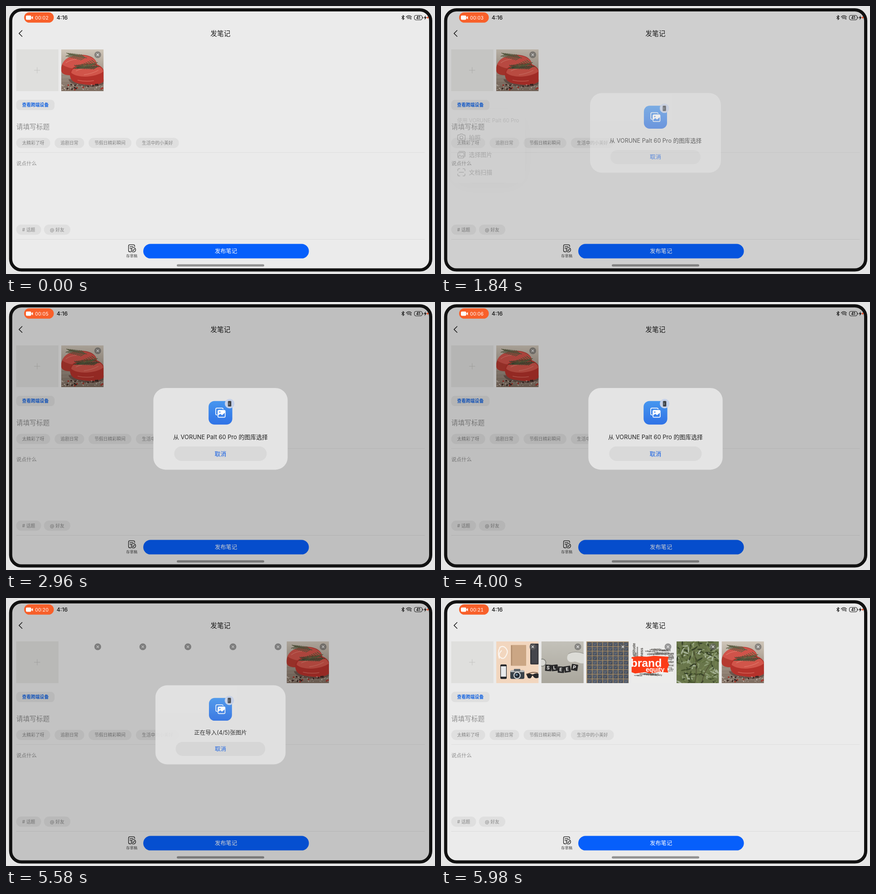
Recreate the animation shown at these times as an HTML page. Size 947 px wide and 592 px high, loop 6.01 s.

```html
<!DOCTYPE html>
<html lang="zh">
<head>
<meta charset="utf-8">
<title>发笔记</title>
<style>
  html, body { margin: 0; width: 100%; height: 100%; overflow: hidden; background: #e5e5e5; }
  svg { display: block; width: 947px; height: 592px; }
  text { font-family: Inter, "Noto Sans CJK SC", "Noto Sans CJK", sans-serif; white-space: pre; }
  .line { fill: none; stroke: #1c1c1c; stroke-width: 1.3; stroke-linecap: round; stroke-linejoin: round; }
  .shadow { filter: drop-shadow(0 9px 26px rgba(0, 0, 0, .12)); }
</style>
</head>
<body>
<svg id="stage" viewBox="0 0 947 592"></svg>
<script>
const LOOP = 6010;
const DEVICE = 'VORUNE Palt 60 Pro';
const THUMB = { w: 93.3, h: 92.3, y: 95.8, step: 99.5, x: 22.5 };

// Markup helpers
const rect = (x, y, w, h, r, fill, extra = '') =>
  `<rect x="${x}" y="${y}" width="${w}" height="${h}" rx="${r}" fill="${fill}" ${extra}/>`;
const circle = (x, y, r, fill, extra = '') =>
  `<circle cx="${x}" cy="${y}" r="${r}" fill="${fill}" ${extra}/>`;
const path = (d, extra = 'class="line"') => `<path d="${d}" ${extra}/>`;
const group = (id, body, extra = '') => `<g id="${id}" ${extra}>${body}</g>`;
// cy is the optical middle of the line
const label = (x, cy, size, str, fill, weight = 400, anchor = 'start', extra = '') =>
  `<text x="${x}" y="${cy + size * .375}" font-size="${size}" fill="${fill}" font-weight="${weight}" text-anchor="${anchor}" ${extra}>${str}</text>`;

function seeded(seed) {
  return () => {
    seed = (seed * 1664525 + 1013904223) % 4294967296;
    return seed / 4294967296;
  };
}
const times = (n, fn) => Array.from({ length: n }, (_, i) => fn(i)).join('');
const slotX = i => THUMB.x + i * THUMB.step;

// Pictures, each drawn in a 93 by 92 box
function sprig(x1, y1, x2, y2, n, color) {
  const dx = (x2 - x1) / n, dy = (y2 - y1) / n;
  let d = `M${x1} ${y1}L${x2} ${y2}`;
  for (let i = 1; i <= n; i++) {
    const x = x1 + dx * i, y = y1 + dy * i, k = 7 - 3 * i / n;
    d += `M${x} ${y}l${dx * 2} ${-k}M${x} ${y}l${dx * 2.4} ${k * .8}`;
  }
  return path(d, `fill="none" stroke="${color}" stroke-width="1.4" stroke-linecap="round"`);
}

function steaks() {
  const rnd = seeded(9);
  return rect(0, 0, 94, 93, 0, 'url(#wood)') +
    times(5, i => path(`M0 ${58 + i * 8}L94 ${52 + i * 9}`, 'stroke="#6b5c50" stroke-opacity=".35" fill="none"')) +
    path('M0 40C4 20 24 11 44 12C66 12 80 22 79 38C70 54 40 56 22 57C8 58 -3 54 0 40Z', 'fill="#b53a30"') +
    path('M2 33C8 18 26 12 44 13C64 14 78 22 76 32C60 44 20 48 2 33Z', 'fill="#d0534a"') +
    path('M16 66C20 84 78 88 94 76V66Z', 'fill="#4a2d27" fill-opacity=".5"') +
    path('M19 56C18 42 30 36 46 33C72 26 92 36 94 48V71C82 80 66 80 48 77C28 75 20 69 19 56Z', 'fill="#b5322b"') +
    path('M22 52C24 40 38 35 52 34C76 30 92 40 93 49C80 60 40 66 22 52Z', 'fill="#d1554a"') +
    path('M32 48Q46 40 62 43M50 56Q68 54 82 46M10 30Q20 22 34 22M36 68Q54 72 72 69', 'fill="none" stroke="#e88b7c" stroke-width="1.3" stroke-opacity=".65"') +
    sprig(56, 19, 20, 12, 9, '#5c5f43') + sprig(84, 38, 37, 39, 12, '#434b34') + sprig(80, 29, 50, 38, 7, '#59613f') +
    times(50, () => circle(rnd() * 93, 77 + rnd() * 14, .4 + rnd() * .6, '#e6ddd2')) +
    times(17, i => circle(12 + rnd() * 80, 77 + rnd() * 12, 1.9, i % 3 ? '#3a2723' : '#a63229'));
}

function desk() {
  return rect(0, 0, 94, 93, 0, '#f2d6be') +
    path('M7 14Q14 8 20 14T24 26Q18 42 10 36T12 20M8 14Q2 24 7 38', 'fill="none" stroke="#fbf5ef" stroke-width="2.2"') +
    rect(32, 8, 34, 46, 1, '#cba684') + rect(33, 9, 2, 44, 0, '#b08d6e') +
    rect(75, 5, 19, 46, 2, '#34353b') + rect(78, 8, 13, 40, 1, '#44454c') +
    rect(9, 51, 14, 32, 2.5, '#25262a') + rect(10.2, 55, 11.6, 23, 0, '#e9eaec') +
    rect(31, 64, 31, 19, 3, '#39424a') + rect(31, 64, 31, 4, 2, '#b8bcbd') + rect(39, 61, 14, 5, 1, '#596269') +
    circle(46, 75, 8, '#d5d8d8') + circle(46, 75, 5.8, '#202831') + circle(45, 74, 2.5, '#607b91') +
    path('M66 72Q72 69 79 73L81 73Q88 69 94 72V80Q84 84 81 76H79Q77 84 70 81Z', 'fill="#28292c"') +
    path('M68 73Q78 66 92 70', 'fill="none" stroke="#6a4b36" stroke-width="1.5"');
}

function sleep() {
  const cubes = [[15, 58, 4], [29, 58, -6], [43, 62, 4], [57, 61, -8], [73, 57, 10]];
  return rect(0, 0, 94, 93, 0, 'url(#wall)') +
    circle(2, 47, 8, '#d8d8d3', 'stroke="#85857f" stroke-width="2"') +
    path('M58 31C64 21 85 21 96 29V48C84 51 78 43 72 45C62 48 54 42 58 31Z', 'fill="#dcdcd7"') +
    path('M60 27Q74 20 94 27', 'fill="none" stroke="#8d8c86"') +
    cubes.map(([x, y, a], i) => `<g transform="translate(${x} ${y}) rotate(${a})">` +
      rect(-6.5, -6.5, 14, 14, 1, '#29292a') + label(0, 0, 10.5, 'SLEEP'[i], '#f0f0ee', 700, 'middle') + '</g>').join('');
}

function tiles() {
  const rnd = seeded(4);
  return rect(0, 0, 94, 93, 0, '#a58c68') +
    times(72, i => {
      const x = 2 + i % 8 * 11.5, y = 2 + Math.floor(i / 8) * 10.2;
      const shade = 72 + Math.floor(rnd() * 14);
      return rect(x, y, 10, 8.8, 0, `rgb(${shade - 3},${shade + 4},${shade + 16})`) +
        path(`M${x + 1} ${y + 3}l4 1l4 -2M${x + 2} ${y + 7}l5 -2`, 'fill="none" stroke="#79818d" stroke-width=".8"');
    });
}

function words() {
  const rnd = seeded(21);
  const list = ['agenda', 'service', 'value', 'leadership', 'image', 'product', 'loyalty', 'market'];
  const ink = '#55534f';
  const sans = 'style="font-family:\'Liberation Sans\',sans-serif"';
  const scatter = (n, x, y, w, h) => times(n, i =>
    label(x + rnd() * w, y + rnd() * h, 3 + i % 4, list[i % 8], ink, 600));
  const upright = (x, y, size, str) =>
    `<text transform="translate(${x} ${y}) rotate(-90)" font-size="${size}" font-weight="700" fill="${ink}">${str}</text>`;
  return rect(0, 0, 94, 93, 0, '#ececeb') +
    upright(8, 34, 8, 'attitude') + upright(14, 34, 5, 'business') + upright(25, 34, 8.5, 'ness') + upright(11, 37, 6, 'love') +
    scatter(16, 28, 16, 48, 14) + scatter(13, 78, 27, 5, 40) + scatter(10, 4, 72, 50, 4) +
    path('M0 35L14 33L34 34L50 32L82 34L80 44L83 52L79 61L81 69L62 67L40 71L30 68L8 71L0 68Z', 'fill="#fb3c17"') +
    label(-2, 46.5, 24.8, 'brand', '#fff', 700, 'start', sans) +
    label(31.5, 61.5, 14, 'equity', '#fff', 700, 'start', sans);
}

function leaves() {
  const rnd = seeded(33);
  const tones = ['#48552f', '#8b9a72', '#5f6f40', '#a9b59a', '#72804f', '#38432a'];
  return rect(0, 0, 94, 93, 0, '#69764b') +
    times(200, i => {
      const x = rnd() * 94, y = rnd() * 93, a = rnd() * 180;
      return `<ellipse transform="translate(${x} ${y}) rotate(${a})" rx="${4 + rnd() * 4}" ry="1.6" fill="${tones[i % 6]}"/>`;
    }) +
    path('M40 93Q48 60 38 20M56 93Q58 70 76 48', 'fill="none" stroke="#4c4a2f" stroke-width="1.2"');
}

const picture = (id, body, slot) =>
  group(id, body, `transform="translate(${slotX(slot)} ${THUMB.y})" clip-path="url(#thumb)"`);
const closeMark = slot => {
  const x = slotX(slot) + 80.5, y = 107.7;
  return circle(x, y, 7.5, 'rgba(95,95,95,.6)') +
    path(`M${x - 2.6} ${y - 2.6}l5.2 5.2m0 -5.2l-5.2 5.2`, 'stroke="#f2f2f2" stroke-width="1.2" fill="none"');
};

// Page parts
const chip = (x, y, w, str, size = 9.8) =>
  rect(x, y, w, 22.4, 11.2, '#dfdfdf') + label(x + w / 2, y + 11.2, size, str, '#858585', 400, 'middle');

const page =
  rect(13, 11, 922, 570, 20, '#ebebeb') +
  path('M35.5 54L28.8 60.6L35.5 67.2', 'class="line" style="stroke-width:1.5"') +
  label(473.3, 60.5, 14.7, '发笔记', '#1a1a1a', 500, 'middle') +
  rect(22.5, THUMB.y, THUMB.w, THUMB.h, 0, '#dfdfdd') +
  path('M62 142H75.5M68.8 135.3V148.7', 'stroke="#c2c2c0" stroke-width="1" fill="none"') +
  group('strip', [desk, sleep, tiles, words, leaves].map((draw, i) => picture('pic' + i, draw(), i + 1)).join('')) +
  picture('meat', steaks(), 1) +
  closeMark(1) + group('marks', times(5, i => closeMark(i + 2))) +
  rect(22.5, 207.3, 84.7, 22.7, 8, '#dfdfdf') +
  label(64.8, 218.6, 9.8, '查看跨端设备', '#1262e0', 700, 'middle') +
  label(22.7, 266, 14.7, '请填写标题', '#8e8e8e') +
  chip(22.5, 291.3, 75, '太精彩了呀') + chip(107.3, 291.3, 65.3, '追剧日常') +
  chip(182.3, 291.3, 94.5, '节假日精彩瞬间') + chip(286.8, 291.3, 94.8, '生活中的小美好') +
  rect(22.5, 323.2, 902, 1, 0, '#dedede') +
  label(22.7, 347.3, 11.3, '说点什么', '#8e8e8e') +
  chip(22.5, 482.8, 55, '# 话题') + chip(83.8, 482.8, 58.2, '@ 好友') +
  rect(22.5, 515, 902, 1, 0, '#dadada') +
  path('M276 543H273.2Q270.5 543 270.5 540.3V530Q270.5 527.3 273.2 527.3H281.3Q284 527.3 284 530V531.5M273.6 531.3H280.5M273.6 535H276') +
  circle(281.3, 538.5, 4.9, 'none', 'class="line"') + path('M278.9 538.5L280.7 540.3L283.8 536.9') +
  label(277.6, 551.8, 8.2, '存草稿', '#444', 400, 'middle') +
  rect(303, 525.6, 365.6, 32, 16, '#065ffb') +
  label(485.6, 541.6, 12.3, '发布笔记', '#fff', 500, 'middle') +
  rect(377, 570.6, 193, 5, 2.5, '#919191');

const statusBar =
  rect(40, 14, 65.5, 22.8, 11.4, '#f8602a') +
  rect(44, 21, 11.6, 9.6, 2.4, '#fff') + path('M56.4 24.6L59.4 22.2V29.4L56.4 27Z', 'fill="#fff"') +
  label(64, 25.9, 10.5, '00:02', '#fff', 400, 'start', 'id="timer" style="font-variant-numeric:tabular-nums"') +
  label(111.8, 25.6, 12.2, '4:16', '#111', 500) +
  path('M873.6 23L879 28L876.3 30.4V20.6L879 23L873.6 28', 'class="line" style="stroke-width:1.1"') +
  path('M883.4 24Q889.3 18.4 895.2 24M885.3 26Q889.3 22.4 893.2 26M887 28Q889.3 26 891 28', 'class="line" style="stroke-width:1.2"') +
  label(892.2, 28.7, 4.6, '6', '#111', 700) +
  rect(901.4, 20.7, 17.2, 10, 3.6, 'none', 'stroke="#222" stroke-width="1.1"') +
  label(910, 25.7, 8.4, '41', '#111', 700, 'middle') + rect(919.8, 24, 1.2, 3.6, .6, '#222') +
  path('M926.6 20.4L922.4 26.4H925L924 31L928.6 24.7H925.8Z', 'fill="#111"') +
  circle(930.8, 25.6, 2.1, '#f0512a');

const menuItem = (y, icon, str) =>
  `<g transform="translate(45 ${y})">${icon}</g>` + label(61.6, y, 12.9, str, '#1a1a1a');
const cameraIcon = path('M-6 -5H-3.8L-2.5 -7H2.5L3.8 -5H6Q8.3 -5 8.3 -2.7V4.5Q8.3 6.8 6 6.8H-6Q-8.3 6.8 -8.3 4.5V-2.7Q-8.3 -5 -6 -5Z') +
  circle(0, .8, 3.4, 'none', 'class="line"');
const photoIcon = rect(-7.8, -5, 13.6, 12.2, 2.8, 'none', 'class="line"') +
  path('M-5.5 -7.5H5Q8.2 -7.5 8.2 -4.4V4M-7.4 4.6L-3.4 1L0 4L2.4 2L5.4 4.8') + circle(-3.6, -1.8, .9, '#1c1c1c');
const scanIcon = path('M-8 -3.4V-5Q-8 -8 -5 -8H-3.4M3.4 -8H5Q8 -8 8 -5V-3.4M8 3.4V5Q8 8 5 8H3.4M-3.4 8H-5Q-8 8 -8 5V3.4M-5 0H5');

const menu =
  rect(22.7, 236.7, 162.3, 161.3, 11, '#ededed', 'class="shadow"') +
  label(35.4, 261, 11.5, '使用 ' + DEVICE, '#6c6c6c') +
  menuItem(297.6, cameraIcon, '拍照') + menuItem(336.5, photoIcon, '选择图片') + menuItem(375.3, scanIcon, '文档扫描');

const dialog =
  rect(325.3, 190, 296.4, 180.4, 27, '#e4e4e4') +
  rect(447.2, 218.8, 52.4, 52, 13, 'url(#app)') +
  path('M466 249.5H465.4Q463 249.5 463 247V237Q463 234.4 465.6 234.4H476.5Q479 234.4 479.3 236.4', 'fill="none" stroke="#fff" stroke-width="1.6" stroke-linecap="round"') +
  rect(467, 238.4, 17.6, 17, 3, '#fff') +
  path('M468.6 250.4L473 247L477 250L483 244.8V252.3Q483 253.8 481.5 253.8H470Q468.6 253.8 468.6 252.3Z', 'fill="#3b82ec"') + circle(472, 243.2, 1.4, '#3b82ec') +
  circle(493.7, 224.5, 10.6, '#c6d2ea') + rect(489.7, 218.4, 7.8, 12.6, 1.6, '#5d6067') +
  rect(491, 219.6, 5.2, 10.2, .8, '#33363c') + rect(491.8, 222, 2, 6, .5, '#777d86') +
  label(473.5, 298, 12.9, '', '#222', 400, 'middle', 'id="message"') +
  rect(371.3, 319, 204.2, 32, 16, '#d9d9d9') +
  label(473.4, 335, 12.8, '取消', '#0f5ce4', 500, 'middle');

const gradient = (id, a, b) =>
  `<linearGradient id="${id}" x1="0" y1="0" x2="0" y2="1"><stop stop-color="${a}"/><stop offset="1" stop-color="${b}"/></linearGradient>`;

document.getElementById('stage').innerHTML =
  '<defs>' + gradient('wood', '#cfc6b9', '#7d6c5f') + gradient('wall', '#c3c1b9', '#a9a69c') + gradient('app', '#4696ef', '#2f72e6') +
  `<clipPath id="thumb">${rect(0, 0, THUMB.w, THUMB.h, 0, '#000')}</clipPath>` +
  `<clipPath id="screen">${rect(13, 11, 922, 570, 20, '#000')}</clipPath></defs>` +
  '<g clip-path="url(#screen)">' + page + group('menu', menu) +
  rect(13, 11, 922, 570, 0, '#000', 'id="scrim"') + group('dialog', dialog) + statusBar + '</g>' +
  rect(10.3, 8.4, 927.2, 574.6, 24, 'none', 'stroke="#111" stroke-width="7"');

// Timeline
const CLOCK = [[0, '02'], [950, '03'], [1990, '04'], [2930, '05'], [3970, '06'], [4630, '19'], [4860, '20'], [5900, '21']];
const MESSAGES = [[0, `从 ${DEVICE} 的图库选择`], [4630, '图片导入中...'], [5420, '正在导入(4/5)张图片']];
const IMPORT_AT = 5420, LOADED_AT = 5640;

const [menuEl, scrimEl, dialogEl, timerEl, messageEl, stripEl, marksEl, meatEl] =
  ['menu', 'scrim', 'dialog', 'timer', 'message', 'strip', 'marks', 'meat'].map(id => document.getElementById(id));
const ratio = (t, from, to) => Math.min(1, Math.max(0, (t - from) / (to - from)));
const easeOut = (p, power) => 1 - (1 - p) ** power;
const smooth = p => p * p * (3 - 2 * p);
const current = (steps, t) => steps.filter(([at]) => at <= t).pop()[1];
const show = (node, on) => node.setAttribute('display', on ? 'inline' : 'none');
const write = (node, str) => { if (node.textContent !== str) node.textContent = str; };

function render(t) {
  const menuIn = easeOut(ratio(t, 70, 320), 2.4);
  const menuOut = easeOut(ratio(t, 1690, 1990), 2.2);
  const menuAlpha = menuIn * (1 - menuOut);
  show(menuEl, menuAlpha > 0);
  menuEl.setAttribute('opacity', menuAlpha);
  menuEl.setAttribute('transform', `translate(0 ${-10 * (1 - menuIn + menuOut)})`);

  const opening = ratio(t, 1710, 2110);
  const closing = smooth(ratio(t, 5505, 5765));
  const alpha = easeOut(opening, 2.4) * (1 - closing ** 1.5);
  const scale = .85 + .15 * (easeOut(opening, 4.5) - closing);
  scrimEl.setAttribute('opacity', .19 * alpha);
  show(dialogEl, alpha > 0);
  dialogEl.setAttribute('opacity', alpha);
  dialogEl.setAttribute('transform', `translate(473.5 280.2) scale(${scale}) translate(-473.5 -280.2)`);

  write(timerEl, '00:' + current(CLOCK, t));
  write(messageEl, current(MESSAGES, t));
  show(stripEl, t >= LOADED_AT);
  show(marksEl, t >= IMPORT_AT);
  meatEl.setAttribute('transform', `translate(${slotX(t >= IMPORT_AT ? 6 : 1)} ${THUMB.y})`);
}

const start = performance.now();
function tick() {
  render((performance.now() - start) % LOOP);
  requestAnimationFrame(tick);
}
tick();
</script>
</body>
</html>
```
